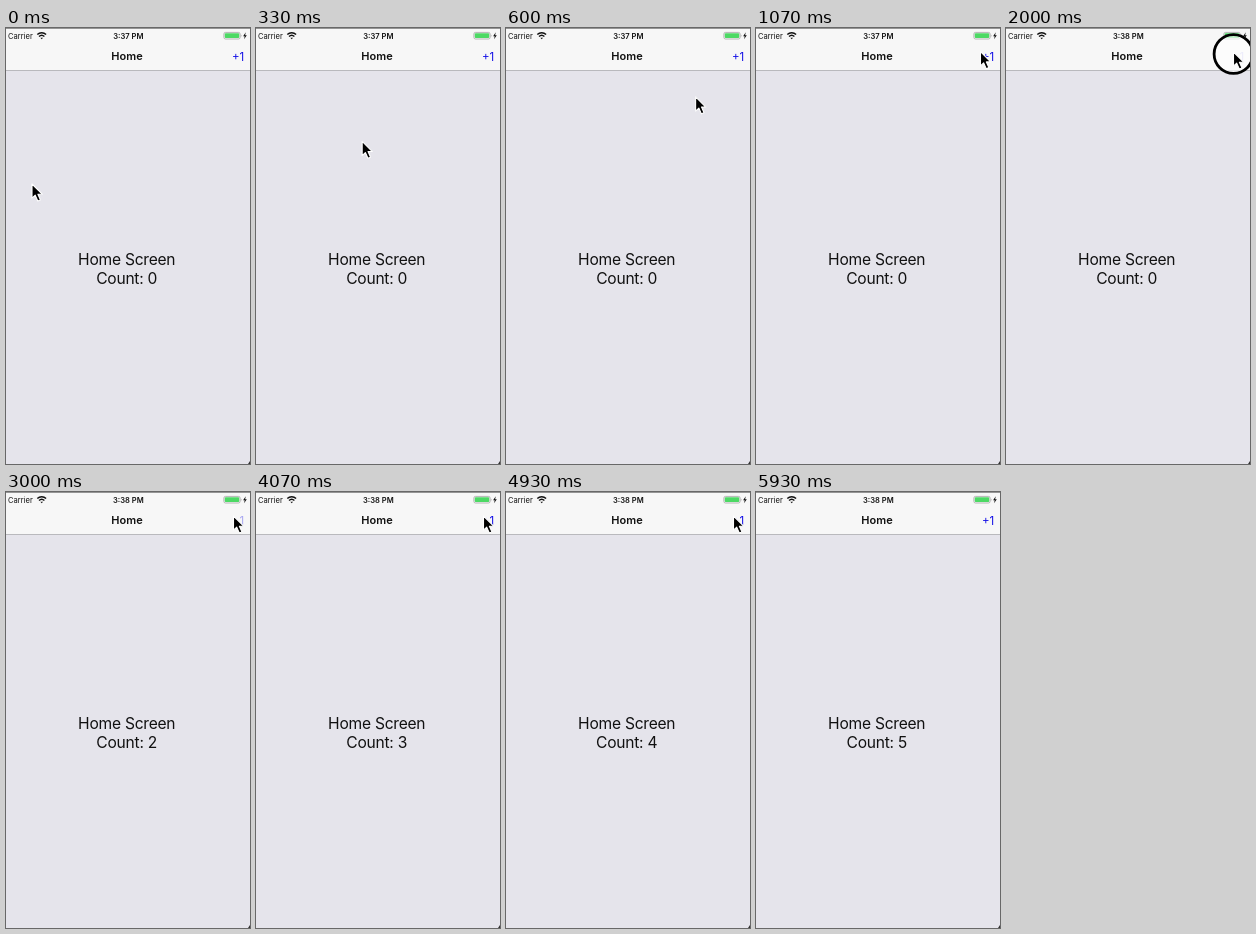
These frames come from a looping animation (244x436 px, 6740 ms). An HTML page:

```html
<!DOCTYPE html>
<html lang="en">
<head>
<meta charset="utf-8">
<title>Counter</title>
<style>
  html, body { margin: 0; width: 100%; height: 100%; overflow: hidden; background: #e5e4eb; }
  svg { display: block; width: 100%; height: 100%; }
  text { font-family: Inter, Roboto, sans-serif; fill: #111; }
  .center { text-anchor: middle; }
  .status { font-size: 7.6px; }
  .title { font-size: 11px; font-weight: 600; }
  .body { font-size: 15.6px; letter-spacing: -.25px; }
</style>
</head>
<body>
<svg viewBox="0 0 244 436">
  <rect width="244" height="436" fill="#e5e4eb"/>
  <rect width="244" height="42" fill="#f7f7f7"/>
  <rect y="42" width="244" height="1" fill="#b9b9bd"/>
  <rect width="244" height=".6" fill="#555"/>
  <path d="M244 433v3h-2z" fill="#333"/>

  <text class="status" x="2" y="10.5">Carrier</text>
  <g fill="none" stroke="#111" stroke-width="1.4">
    <path d="M31.3 6.6a6.3 6.3 0 0 1 8.8 0M33 8.6a3.9 3.9 0 0 1 5.4 0"/>
    <path d="M34.4 9.8h2.6l-1.3 1.5z" fill="#111" stroke="none"/>
  </g>
  <text class="status center" id="clock" x="122.3" y="10.5" font-weight="600"></text>
  <rect x="217.9" y="4.4" width="16.2" height="6.6" rx="1.6" fill="none" stroke="#999" stroke-width=".7"/>
  <rect x="218.8" y="5.3" width="14.4" height="4.8" rx=".8" fill="#4cd964"/>
  <path d="M234.9 6.5q1.4 1.2 0 2.4z" fill="#999"/>
  <path d="M239.8 4.3l-2.7 3.9h1.6l-.6 3 2.7-4h-1.7z" fill="#111"/>

  <text class="title center" x="121" y="32">Home</text>
  <text id="plus" x="226" y="32.7" font-size="11.5" style="fill:#1410e6">+1</text>

  <text class="body center" x="120.7" y="236.6">Home Screen</text>
  <text class="body center" id="count" x="120.7" y="255.8"></text>

  <circle id="ring" cx="227.5" cy="26" r="19.4" fill="#fff" fill-opacity=".65" stroke="#000" stroke-width="2.8"/>
  <path id="cursor" d="M0 0V14.2L3.2 11.2L5.8 17L8.4 15.9L5.9 10.2H10.2Z"
        fill="#000" stroke="#fff" stroke-width="1.1" stroke-linejoin="round"/>
</svg>
<script>
const LOOP = 6740, STEP = 1000 / 15;
const presses = [[2000, 2133], [2800, 2933], [3533, 3800], [4333, 4667], [5067, 5200]];
const path = [[0, 26, 156], [600, 189.5, 69], [733, 205, 50], [1133, 225, 23], [1333, 227.5, 24], [LOOP, 227.5, 24]];
const el = Object.fromEntries(["clock", "plus", "count", "ring", "cursor"].map(id => [id, document.getElementById(id)]));

const clamp = v => Math.max(0, Math.min(1, v));
const smooth = v => v * v * (3 - 2 * v);
const easeOut = v => v * (2 - v);
// The first sweep starts gently and is still moving when it meets the next segment.
const eases = [u => smooth(u * .85) / smooth(.85), u => u, easeOut, u => u, u => u];

function cursorAt(t) {
  const i = path.findIndex((p, k) => k + 1 < path.length && t < path[k + 1][0]);
  const [t0, x0, y0] = path[i], [t1, x1, y1] = path[i + 1];
  const u = eases[i]((t - t0) / (t1 - t0));
  return [x0 + (x1 - x0) * u, y0 + (y1 - y0) * u];
}

function draw(now) {
  const t = Math.floor((now % LOOP + 4) / STEP) * STEP + 1;
  const clicks = presses.filter(([, up]) => t >= up);
  const pressed = presses.some(([down, up]) => t >= down && t < up);
  const lastUp = clicks.length ? clicks[clicks.length - 1][1] : -LOOP;

  el.clock.textContent = t < 1467 ? "3:37 PM" : "3:38 PM";
  el.count.textContent = "Count: " + clicks.length;
  el.ring.style.display = pressed ? "" : "none";
  el.plus.style.opacity = pressed ? .2 : .2 + .8 * smooth(clamp((t - lastUp) / 250));
  const [x, y] = cursorAt(Math.min(t, LOOP - 1));
  el.cursor.setAttribute("transform", `translate(${x} ${y})`);
  el.cursor.style.opacity = 1 - clamp((t - 5667) / 260);
}

const start = performance.now();
function frame() {
  draw(performance.now() - start);
  requestAnimationFrame(frame);
}
frame();
</script>
</body>
</html>
```
